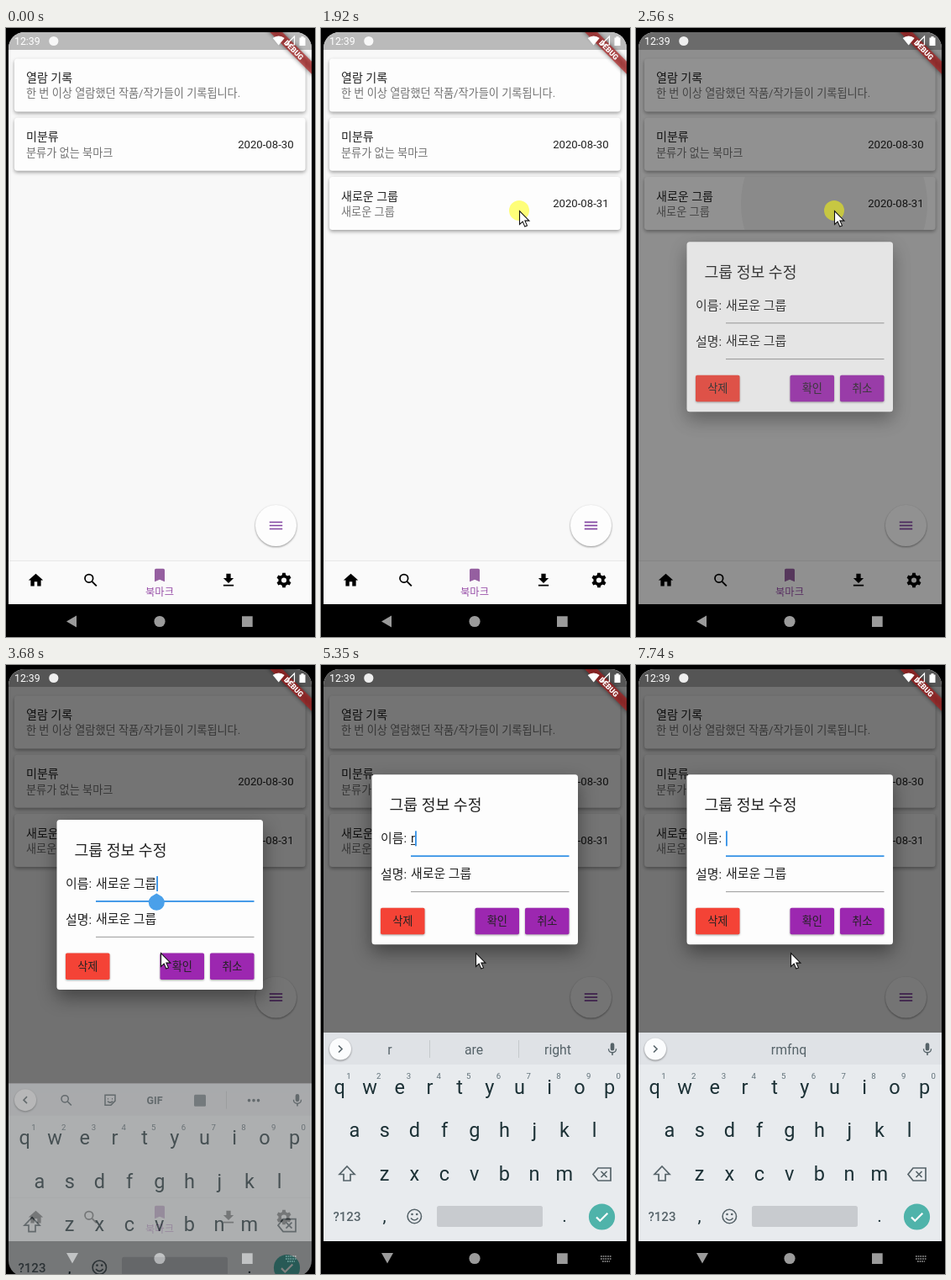
An HTML page that plays this animation: 368 px wide and 724 px high, repeating every 7990 ms.

```html
<!DOCTYPE html>
<html lang="ko">
<head>
<meta charset="utf-8">
<style>
html, body { margin: 0; width: 100%; height: 100%; overflow: hidden; background: #000; }
svg { display: block; width: 368px; height: 724px; }
text { font-family: Roboto, 'Noto Sans CJK KR', 'Noto Sans CJK', sans-serif; white-space: pre; }
.card { filter: drop-shadow(.7px 2px 2px rgba(0,0,0,.36)); }
.fab { filter: drop-shadow(0 1px 1px rgba(0,0,0,.42)); }
.sheet { filter: drop-shadow(0 9px 11px rgba(0,0,0,.42)); }
.btn { filter: drop-shadow(0 1px 1px rgba(0,0,0,.35)); }
</style>
</head>
<body>
<svg id="stage" viewBox="0 0 368 724" xmlns="http://www.w3.org/2000/svg"></svg>
<script>
const LOOP = 7990;
const INK = '#222', SOFT = '#747474', PURPLE = '#9c27b0', BLUE = '#3290e6', KEY = '#1c3136', GREY = '#566369';

const text = (x, y, s, size, fill = INK, more = '') =>
  `<text x="${x}" y="${y}" font-size="${size}" fill="${fill}" ${more}>${s}</text>`;
const mid = (x, y, s, size, fill, more = '') => text(x, y, s, size, fill, `text-anchor="middle" ${more}`);
const rect = (x, y, w, h, fill, more = '') =>
  `<rect x="${x}" y="${y}" width="${w}" height="${h}" fill="${fill}" ${more}/>`;
const disc = (x, y, r, fill, more = '') => `<circle cx="${x}" cy="${y}" r="${r}" fill="${fill}" ${more}/>`;
const line = (d, color, w = 1.6, more = '') =>
  `<path d="${d}" fill="none" stroke="${color}" stroke-width="${w}" ${more}/>`;
const group = (id, body, more = '') => `<g id="${id}" ${more}>${body}</g>`;
// 24-unit icon centred on x, y
const icon = (x, y, size, body, fill) =>
  `<g transform="translate(${x - size / 2} ${y - size / 2}) scale(${size / 24})" fill="${fill}">${body}</g>`;
const shape = d => `<path d="${d}"/>`;

const HOME = shape('M10 20v-6h4v6h5v-8h3L12 3 2 12h3v8z');
const BOOKMARK = shape('M17 3H7c-1.1 0-2 .9-2 2v16l7-3 7 3V5c0-1.1-.9-2-2-2z');
const DOWNLOAD = shape('M19 9h-4V3H9v6H5l7 7 7-7zM5 18v2h14v-2H5z');
const MIC = shape('M12 14a3 3 0 0 0 3-3V5a3 3 0 0 0-6 0v6a3 3 0 0 0 3 3zm5-3a5 5 0 0 1-10 0H5.300a6.700 6.700 0 0 0 5.700 6.700V21h2v-3.300a6.700 6.700 0 0 0 5.700-6.700z');
const search = c => disc(9.5, 9.5, 5.5, 'none', `stroke="${c}" stroke-width="2"`) + line('M13.800 13.800l6 6', c, 2.2);
const gear = c => disc(12, 12, 5.5, 'none', `stroke="${c}" stroke-width="4"`) +
  [0, 60, 120, 180, 240, 300].map(a => `<path d="M10 2h4l.8 4.500h-5.600z" transform="rotate(${a} 12 12)"/>`).join('');

function card(y, title, sub, date) {
  return rect(10, y, 346.6, 63, '#fdfdfd', 'rx="3.500" class="card"') +
    text(24, y + 27.6, title, 14.04) + text(24, y + 46, sub, 13.16, SOFT) +
    (date ? text(342.6, y + 106.6 - 70.3, date, 13.16, INK, 'text-anchor="end"') : '');
}

function dialChild(id, y, label, glyph) {
  return group(id, disc(321.5, y, 17.5, '#fdfdfd', 'class="fab"') + line(glyph, PURPLE, 1.6, `transform="translate(321.500 ${y})"`) +
    rect(296 - label.length * 12 - 10, y - 12, label.length * 12 + 6, 24, '#fdfdfd', 'rx="3" class="fab"') +
    text(296 - label.length * 12 - 4, y + 4.5, label, 12.3), 'opacity="0"');
}

function button(x, label, fill) {
  return rect(x, 158.5, 52.5, 31.5, fill, 'rx="1.800" class="btn"') + mid(x + 26.3, 179, label, 13.2, INK);
}

function page() {
  const c3 = group('newCard', card(177, '새로운 그룹', '새로운 그룹', '2020-08-31') +
    `<g clip-path="url(#cardClip)">${disc(236, 209, 10, '#000', 'id="ripple" opacity="0"')}</g>`);
  const tabs = rect(3, 634, 361, 51, '#fafafa') + rect(3, 633, 361, 1, '#e8e8e8') +
    icon(35.5, 656.5, 21, HOME, '#000') + icon(101, 656.5, 21, search('#000'), '#000') +
    icon(183, 650.5, 20.5, BOOKMARK, '#955fa0') + mid(183, 675, '북마크', 12.3, '#984fa8') +
    icon(265, 656.5, 21, DOWNLOAD, '#000') + icon(331, 656.5, 21, gear('#000'), '#000');
  const fab = group('fab', disc(321.5, 591.5, 24.5, '#fdfdfd', 'class="fab"') +
    [-4, 0, 4].map((d, i) => `<path id="bar${i}" d="M-7.700 0h15.400" stroke="#8143a0" stroke-width="1.700" transform="translate(321.500 ${591.5 + d})"/>`).join(''));
  return rect(3, 5, 361, 680, '#f8f8f8') + rect(3, 5, 361, 21, '#bababa') +
    card(36.4, '열람 기록', '한 번 이상 열람했던 작품/작가들이 기록됩니다.') +
    card(106.7, '미분류', '분류가 없는 북마크', '2020-08-30') + c3 +
    rect(3, 5, 361, 629, '#fff', 'id="veil" opacity="0"') +
    dialChild('dial1', 480, '새로운 그룹', 'M0 -7v14M-7 0h14') +
    dialChild('dial0', 535, '편집', 'M-6 -4h12M-6 0h8M-6 4h4') + tabs + fab;
}

function dialog() {
  return group('dialog', rect(60.5, 0, 245.5, 202, '#fdfdfd', 'rx="3.500" class="sheet"') +
    text(81.5, 42.5, '그룹 정보 수정', 18.3) +
    text(71, 81, '이름:', 14.9) + text(71, 123.5, '설명:', 14.9) +
    text(107, 81, '', 14.9, INK, 'id="name"') + text(107, 123, '새로운 그룹', 14.9) +
    rect(107, 82.6, 0, 1, INK, 'id="compose"') + rect(107, 96, 188.5, 1, '#999', 'id="rule"') +
    rect(107, 138.8, 188.5, 1, '#999') +
    button(71, '삭제', '#f44336') + button(183.5, '확인', PURPLE) + button(243, '취소', PURPLE) +
    rect(0, 67, 1.8, 18, BLUE, 'id="caret"') +
    `<path id="handle" d="M179.300 87.500l6.600 4a9.500 9.500 0 1 1-13.200 0z" fill="#4aa0ea"/>`);
}

function status() {
  return text(10, 20, '12:39', 12.3, '#fff') + disc(56.8, 15.5, 5.6, '#fff', 'opacity=".9"') +
    '<path d="M324.700 20.500l-7-8.500a11 11 0 0 1 14 0z" fill="#fff"/>' +
    line('M333.500 20h10v-10z', '#fff', 1.2) + '<path d="M349.500 11.500h2v-1.500h3v1.500h2v9.500h-7z" fill="#fff"/>';
}

function banner() {
  return `<g transform="translate(364 5) rotate(45)">
    ${rect(-45, 24.6, 90, 10.6, '#000', 'opacity=".5" filter="url(#blur)"')}
    ${rect(-45, 24.6, 90, 10.6, '#b71c1c', 'opacity=".63"')}
    ${mid(0, 33.1, 'DEBUG', 8.9, '#fff', 'font-weight="900"')}</g>`;
}

function navBar() {
  return rect(3, 685, 361, 40, '#000') +
    '<path id="back" d="M84 698.500v14l-12-7z" fill="#9b9b9b"/><path id="hide" d="M72 699h14l-7 12.500z" fill="#9b9b9b"/>' +
    disc(183, 705.5, 6.6, '#9b9b9b') + rect(281, 699.3, 12.7, 12.7, '#9b9b9b') +
    line('M333 703h13M333 706h13M335 709h9', '#9b9b9b', 1.6, 'stroke-dasharray="1.700 1" id="ime"');
}

function keyboard() {
  const row = (keys, x, y) => [...keys].map((k, i) => mid(x + 35.7 * i, y, k, 23.5, KEY)).join('');
  const digits = [...'1234567890'].map((d, i) => mid(33 + 35.7 * i, 492, d, 9.6, '#5f7078')).join('');
  const tools = group('tools', line('M25 452.500l-4 4 4 4', GREY) + icon(72, 457, 18, search(GREY), GREY) +
    line('M118 450.500h12v7l-5 5h-7zM121 455h1M126 455h1M121 458q3 3 6 0', GREY, 1.5) +
    mid(177, 461.5, 'GIF', 12.5, GREY, 'font-weight="700"') + rect(224, 450, 14, 14, GREY, 'rx="1.500" opacity=".75"') +
    rect(262, 446, 1, 21, '#c5c9cc') + [289.5, 295, 300.5].map(x => disc(x, 457, 1.8, GREY)).join(''));
  const words = group('words', line('M21 452.500l4 4-4 4', GREY) +
    [82, 182, 282].map((x, i) => mid(x, 462.5, '', 15.8, GREY, `id="word${i}"`)).join('') +
    line('M129.500 446v21M235.500 446v21', '#c5c9cc', 1, 'id="split"'));
  return group('keys', rect(3, 437, 361, 248, '#e8ebee') + rect(3, 437, 361, 38, '#dfe2e6') +
    disc(23, 456.5, 13, '#fbfcfd', 'class="fab"') + tools + words + icon(347, 457, 18.5, MIC, GREY) +
    row('qwertyuiop', 22.3, 509.5) + digits + row('asdfghjkl', 40, 561) + row('zxcvbnm', 75.6, 612.5) +
    line('M31 596l9 9.500h-5v7.500h-8v-7.500h-5z', GREY, 1.7) +
    line('M330 598h15v15h-15l-6-7.500zM333.500 602l7 7M340.500 602l-7 7', GREY, 1.7) +
    mid(31, 661, '?123', 15, GREY, 'font-weight="500"') + mid(75.6, 662, ',', 21, KEY) + mid(290, 662, '.', 21, KEY) +
    disc(111.3, 655.5, 8.2, 'none', `stroke="${GREY}" stroke-width="1.600"`) +
    disc(108.5, 653, 1.3, GREY) + disc(114.2, 653, 1.3, GREY) + line('M107 657.500q4.300 5 8.600 0', GREY) +
    rect(138, 643, 126, 25, '#c8cbcf', 'rx="2.500"') + disc(334.5, 656, 15.6, '#4fb3aa') +
    line('M328 656.500l4.300 4.300 9-9', '#fff', 2.2));
}

const stage = document.getElementById('stage');
stage.innerHTML = `<defs>
  <clipPath id="screen"><rect x="3" y="5" width="361" height="722" rx="19"/></clipPath>
  <clipPath id="cardClip"><rect x="10" y="177" width="346.600" height="63" rx="3.500"/></clipPath>
  <filter id="blur" x="-20%" y="-150%" width="140%" height="400%"><feGaussianBlur stdDeviation="2.500"/></filter>
</defs><g clip-path="url(#screen)">` + page() +
  rect(3, 5, 361, 680, '#000', 'id="shade" opacity="0"') + dialog() + banner() + status() + navBar() + keyboard() + '</g>' +
  group('mouse', disc(0, 0, 12, '#ff0', 'id="press" opacity=".52"') +
    '<path d="M.500.500v16l3.700-3.400 2.600 6 2.700-1.200-2.600-5.800h5z" fill="#fff" stroke="#111" stroke-width="1.100"/>');

const el = {};
stage.querySelectorAll('[id]').forEach(n => el[n.id] = n);
const set = (id, name, v) => el[id].setAttribute(name, v);
const show = (id, on) => set(id, 'visibility', on ? 'inherit' : 'hidden');
const ramp = (t, a, b) => Math.min(1, Math.max(0, (t - a) / (b - a)));
const slow = p => 1 - (1 - p) ** 2;
const within = (t, a, b) => t >= a && t < b;
const latest = (list, t) => list.reduce((v, [at, x]) => t >= at ? x : v, list[0][1]);

const MOVES = [[0, 336, 745], [20, 335, 738], [360, 324, 594], [820, 324, 590], [1000, 325, 482], [1200, 325, 480],
  [1420, 318, 418], [1610, 300, 338], [1915, 236, 217], [2680, 236, 217], [3060, 184, 342], [LOOP, 184, 342]];
const PRESSES = [[380, 480], [1050, 1150], [1900, 2640], [3100, 3200]];
const NAMES = [[0, '새로운 그룹'], [4380, '새로운 그'], [4500, '새로운 '], [4970, '새로운'], [5000, '새로'], [5035, '새'], [5070, ''],
  [5350, 'r'], [5780, 'rm'], [5940, 'rmf'], [6110, 'rmfn'], [6310, 'rmfnq'],
  [7150, 'rmfn'], [7640, 'rmf'], [7670, 'rm'], [7705, 'r'], [7740, '']];
const HINTS = [[0, 'a,I,to'], [4970, ',,'], [5350, 'r,are,right'], [5820, 'rm,room,terms'],
  [5980, 'rmf,ref,from'], [6150, ',rmfn,'], [6380, ',rmfnq,']];

function pointer(t) {
  const i = Math.max(1, MOVES.findIndex(m => t < m[0]));
  const [a, b] = [MOVES[i - 1], MOVES[i]], p = ramp(t, a[0], b[0]);
  return [a[1] + (b[1] - a[1]) * p, a[2] + (b[2] - a[2]) * p];
}

function draw(t) {
  // speed dial
  const open = ramp(t, 460, 640) * (1 - ramp(t, 1130, 1300));
  set('veil', 'opacity', .2 * open);
  [535, 480].forEach((y, i) => {
    const k = ramp(t, 500 + i * 90, 680 + i * 90) * (1 - ramp(t, 1210 - i * 70, 1330 - i * 70));
    set('dial' + i, 'opacity', k ? 1 : 0);
    set('dial' + i, 'transform', `translate(${321.5 * (1 - k)} ${y * (1 - k)}) scale(${k})`);
  });
  [-4, 0, 4].forEach((d, i) => set('bar' + i, 'transform',
    `translate(321.500 ${591.5 + d * (1 - open)}) rotate(${-45 * Math.sign(d) * open})`));
  set('bar1', 'opacity', 1 - open);
  show('newCard', t >= 1300);

  // long press
  set('ripple', 'r', 12 + 91 * ramp(t, 2090, 2260) + 12 * ramp(t, 2480, 2600));
  set('ripple', 'opacity', t < 2090 ? 0 : .05 * (1 - ramp(t, 2580, 2800)));

  // dialog and keyboard
  const fade = slow(ramp(t, 2480, 2630));
  const lift = slow(ramp(t, 3640, 3760));
  const rise = ramp(t, 3590, 3770);
  set('shade', 'opacity', .54 * fade);
  set('dialog', 'opacity', fade);
  show('dialog', fade > 0);
  set('dialog', 'transform', `translate(0 ${254.3 - 124 * lift})`);
  set('fab', 'transform', `translate(0 ${t >= 3640 ? -196.5 : 0})`);
  set('keys', 'transform', `translate(0 ${248 * (1 - rise) ** 2})`);
  set('keys', 'opacity', rise);
  show('back', t < 3600);
  show('hide', t >= 3600);
  show('ime', t >= 3600);
  show('tools', t < 3920);
  show('words', t >= 3920);
  const hints = latest(HINTS, t).split(',');
  hints.forEach((w, i) => el['word' + i].textContent = w);
  show('split', hints[0]);

  // name field
  const focus = t >= 3280;
  el.name.textContent = latest(NAMES, t);
  const width = el.name.textContent ? el.name.getComputedTextLength() : 0;
  set('compose', 'width', t >= 5350 ? width : 0);
  set('rule', 'fill', focus ? BLUE : '#999');
  set('rule', 'height', focus ? 1.8 : 1);
  set('caret', 'x', 107 + width);
  show('caret', focus && !within(t, 6870, 7150));
  show('handle', focus && t < 4380);

  // mouse
  const [x, y] = pointer(t);
  set('mouse', 'transform', `translate(${x} ${y})`);
  show('press', PRESSES.some(([a, b]) => within(t, a, b)));
}

function tick() {
  draw(performance.now() % LOOP);
  requestAnimationFrame(tick);
}
tick();
</script>
</body>
</html>
```
